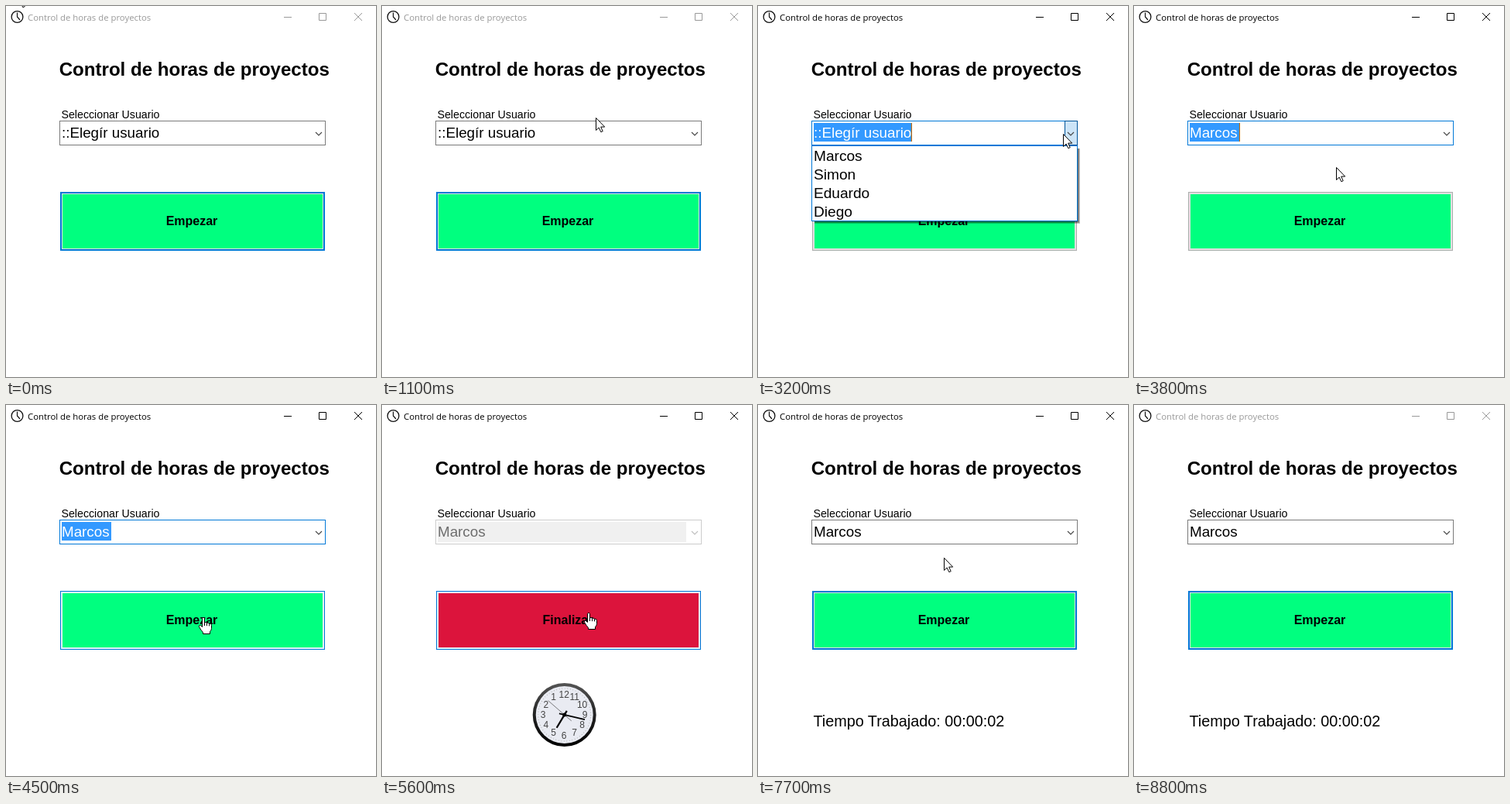
An HTML page for the animation above (8.9 s loop, 478 px wide and 479 px high).

```html
<!DOCTYPE html>
<html lang="es">
<head>
<meta charset="utf-8">
<style>
  html, body { margin: 0; height: 100%; overflow: hidden; background: #fff; }
  svg { display: block; width: 100vw; height: 100vh; }
  text { font-family: "Liberation Sans", Arial, sans-serif; white-space: pre; }
  .bar { font: 11.35px "Open Sans", "Noto Sans", sans-serif; }
</style>
</head>
<body>
<svg id="stage" viewBox="0 0 478 479"></svg>
<script>
const LOOP = 8900, STEP = 100;
const USERS = ["Marcos", "Simon", "Eduardo", "Diego"];
const BLUE = "#0078d7";

// Pointer hot spot: time, x, y
const PATH = [
  [0, 15, -17], [600, 197, 103], [700, 197, 103], [1300, 316, 165], [2200, 316, 165],
  [2500, 227, 187], [2800, 394, 165], [3200, 394, 165], [3500, 262, 192], [3700, 262, 192],
  [4200, 259, 271], [4300, 259, 271], [4500, 255, 274], [5200, 255, 274], [5600, 267, 268],
  [5900, 267, 268], [6300, 277, 266], [6700, 270, 267], [6800, 270, 267], [7000, 271, 265],
  [7500, 271, 265], [8000, 194, 96], [8200, 125, 34], [8300, 125, 34], [8700, 90, -22], [LOOP, 90, -22]
];

function pointerAt(t) {
  const i = PATH.findIndex(p => p[0] > t);
  const [t0, x0, y0] = PATH[i - 1], [t1, x1, y1] = PATH[i];
  const k = (t - t0) / (t1 - t0);
  return [Math.round(x0 + (x1 - x0) * k), Math.round(y0 + (y1 - y0) * k)];
}

const within = (x, y, l, t, r, b) => x >= l && x < r && y >= t && y < b;

const rect = (x, y, w, h, fill) =>
  `<rect x="${x}" y="${y}" width="${w}" height="${h}" fill="${fill}"/>`;

const frame = (x, y, w, h, line, fill, size = 1) =>
  rect(x, y, w, h, line) + rect(x + size, y + size, w - 2 * size, h - 2 * size, fill);

const text = (x, y, size, str, fill = "#000", more = "") =>
  `<text x="${x}" y="${y}" font-size="${size}" fill="${fill}" ${more}>${str}</text>`;

const line = (d, stroke, width = 1) =>
  `<path d="${d}" fill="none" stroke="${stroke}" stroke-width="${width}"/>`;

function titleBar(active) {
  const ink = active ? "#000" : "#999";
  return `<circle cx="14.5" cy="14" r="7.4" fill="#fff" stroke="#111" stroke-width="1.3"/>` +
    line("M14.5 8.5V14l3.5 4", "#111", 1.2) +
    `<text class="bar" x="28" y="19" fill="${ink}">Control de horas de proyectos</text>` +
    line("M359 14.5h10M404.5 9.5h9v9h-9zM450 9l10 10M460 9l-10 10", ink);
}

function combo(s) {
  const name = s.picked ? USERS[0] : "::Elegír usuario";
  const width = s.picked ? 64 : 126;
  let out = frame(69, 148, 344, 32, s.comboLine, "#fff");
  if (s.running) out += rect(72, 151, 321, 26, "#f0f0f0");
  if (s.arrowFill) out += frame(396, 148, 17, 32, s.arrowLine, s.arrowFill);
  if (s.selected) out += rect(72, 151, width, 24, "#3399ff");
  if (s.caret) out += rect(72 + width, 151, 1, 24, "#cc6600");
  const ink = s.running ? "#6d6d6d" : s.selected ? "#fff" : "#000";
  return out + text(72, 170, 18.8, name, ink) +
    line("M400 163l4 4l4 -4", s.running ? "#bfbfbf" : "#444", 1.1);
}

function button(s) {
  const [edge, inner, size] = s.pressed ? ["#005499", "#cce4f7", 1]
    : s.overButton ? [BLUE, "#e5f1fb", 1]
    : s.focused ? [BLUE, "#e1e1e1", 2] : ["#adadad", "#e1e1e1", 1];
  return frame(70, 240, 342, 76, edge, inner, size) +
    rect(73, 243, 336, 70, s.running ? "#dc143c" : "#00ff7f") +
    text(240, 283, 16, s.running ? "Finalizar" : "Empezar", "#000", 'text-anchor="middle" font-weight="700"');
}

// A wall clock that runs backwards
function clock(tick) {
  const turn = 25 - 70.5 * (tick % 5);
  const hand = (angle, tail, length, width, ink) =>
    `<path d="M0 ${tail}V${-length}" stroke="${ink}" stroke-width="${width}" transform="rotate(${angle})"/>`;
  let out = `<defs><linearGradient id="rim" x2="0" y2="1"><stop stop-color="#555"/><stop offset=".5" stop-color="#222"/><stop offset="1" stop-color="#000"/></linearGradient></defs>
    <circle r="41" fill="url(#rim)"/><circle r="37" fill="#e9ebf2"/>
    <circle r="34" fill="none" stroke="#aaa" stroke-width="1.2" stroke-dasharray=".7 2.86"/>`;
  for (let n = 1; n <= 12; n++) {
    const a = n * Math.PI / 6;
    out += text(-.5 - 27 * Math.sin(a), 4 - 26.5 * Math.cos(a), 12, n, "#444", 'text-anchor="middle"');
  }
  out += hand(turn + 208, 12, 28, .7, "#555") + hand(turn + 108, 6, 19.5, 2.2, "#000") +
    hand(turn, 7, 27, 1.8, "#000") + `<circle r="2.5"/>`;
  return `<g transform="translate(235.7 400)">${out}</g>`;
}

function list(row) {
  let out = "";
  for (let i = 1; i <= 3; i++) out += rect(73, 184, 340 + i, 94 + i, "rgba(0,0,0,.25)");
  out += frame(69, 180, 344, 98, BLUE, "#fff");
  USERS.forEach((user, i) => {
    if (i === row) out += rect(70, 181 + 24 * i, 342, 24, BLUE);
    out += text(72, 200 + 24 * i, 19.1, user, i === row ? "#fff" : "#000");
  });
  return out;
}

const SHAPES = {
  arrow: `<path d="M.5 .5v16l3.7-3.4 2.6 5.6 2.4-1-2.5-5.6h5z" fill="#fff" stroke="#000"/>`,
  beam: line("M-2.5 -7.5h2M.5 -7.5h2M0 -7v15M-2.5 8.5h2M.5 8.5h2", "#e6e6e6"),
  hand: `<path d="M-1.5 12V1.5Q-1.5 .5 0 .5T1.5 1.5V7Q3 5.6 4.5 7.4 6 6.4 7.5 8.2 10.5 7.6 10.5 10.5V14.5Q10.3 17 8.5 18.5V21.5H-.5V19.5Q-3 17-5.5 12.5-6 10.4-4.5 10.4-3 10.4-1.5 12.6z" fill="#fff" stroke="#000"/>
    <path d="M1.5 7v4M4.5 7.6v3.6M7.5 8.4v3" stroke="#000"/>`
};

function draw(t) {
  const [x, y] = pointerAt(t);
  const during = (a, b) => t >= a && t < b;
  const open = during(3100, 3800);
  const running = during(4800, 7300);
  const overButton = !open && within(x, y, 70, 240, 412, 316);
  const overCombo = within(x, y, 69, 148, 413, 180);
  const arrowDown = during(3000, 3800);
  const arrowOver = during(2800, 3000);
  const s = {
    running, overButton,
    picked: t >= 3800,
    selected: during(2000, 4800),
    caret: during(2000, 4400),
    focused: t < 2000 || t >= 4700,
    pressed: during(4700, 4800) || during(7200, 7300),
    arrowFill: arrowDown ? "#cce4f7" : arrowOver && "#e5f1fb",
    arrowLine: arrowDown ? "#005499" : BLUE,
    comboLine: running ? "#ccc" : t === 2000 ? "#003c70" : during(2100, 4800) ? BLUE
      : overCombo ? "#171717" : "#7a7a7a"
  };
  const row = within(x, y, 70, 181, 412, 277) ? Math.floor((y - 181) / 24) : -1;
  const shape = overButton ? "hand"
    : overCombo && x < 393 && !open && !running ? "beam" : "arrow";

  document.getElementById("stage").innerHTML = rect(0, 0, 478, 479, "#fff") +
    titleBar(during(2000, 8800)) +
    text(68.7, 90, 24.08, "Control de horas de proyectos", "#000", 'font-weight="700"') +
    text(71.5, 145, 14.2, "Seleccionar Usuario") +
    combo(s) + button(s) +
    (running ? clock(Math.min(10, Math.floor((t - 4660) / 220))) : "") +
    (t >= 7300 ? text(71.5, 415, 19.8, "Tiempo Trabajado: 00:00:02") : "") +
    (open ? list(row) : "") +
    `<g transform="translate(${x} ${y})">${SHAPES[shape]}</g>`;
}

let start, last = -1;
function tick(now) {
  start ??= now;
  const t = Math.floor((now - start) % LOOP / STEP) * STEP;
  if (t !== last) draw(last = t);
  requestAnimationFrame(tick);
}
draw(0);
requestAnimationFrame(tick);
</script>
</body>
</html>
```
